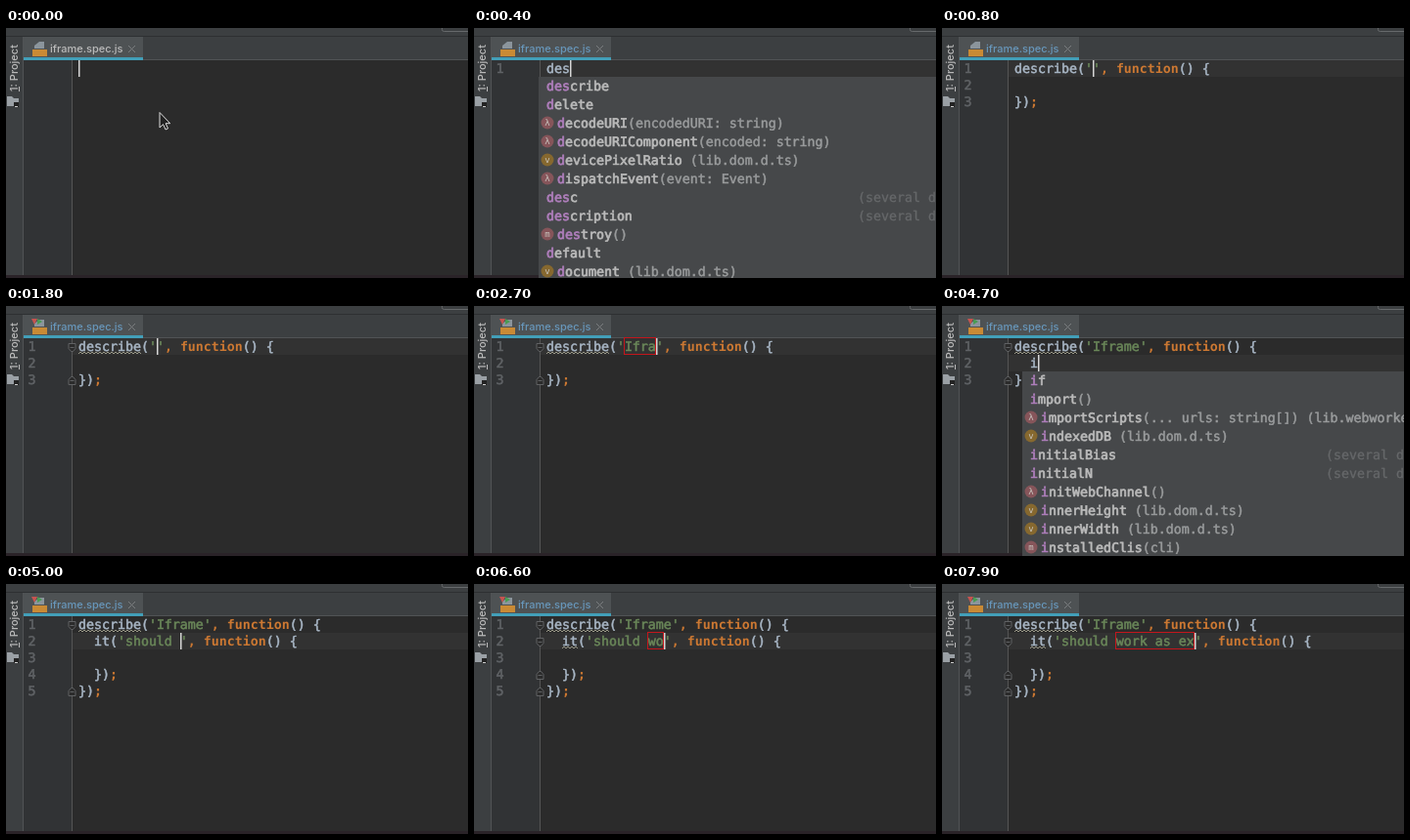
Animation of 472 by 256 pixels, one loop 8 s. Source, as an HTML page:

```html
<!DOCTYPE html>
<html lang="en">
<head>
<meta charset="utf-8">
<title>Editor typing</title>
<style>
html, body { margin: 0; width: 100%; height: 100%; overflow: hidden; background: #2b2b2b; }
svg { display: block; width: 472px; height: 256px; }
text { white-space: pre; font: 500 11px Inter, "Liberation Sans", sans-serif; fill: #bbb; }
.code text { font: 13.288px "DejaVu Sans Mono", monospace; fill: #a9b7c6; stroke: #a9b7c6; stroke-width: .55; text-rendering: geometricPrecision; }
.code .num { fill: #606366; stroke: #606366; }
.code .str { fill: #6a8759; stroke: #6a8759; }
.code .key { fill: #cc7832; stroke: none; font-weight: bold; }
.code .name { fill: #bbb; stroke: #bbb; stroke-width: .7; }
.code .hit { fill: #b07fbd; stroke: #b07fbd; }
.code .dim { fill: #66686a; stroke: #66686a; stroke-width: .3; }
.code .tail { fill: #9a9c9d; stroke: #9a9c9d; stroke-width: .5; }
.code .mark { font: 9px "DejaVu Sans Mono", monospace; fill: #c8c3bd; stroke: none; text-anchor: middle; }
</style>
</head>
<body>
<svg viewBox="0 0 472 256">
  <rect width="472" height="256" fill="#2b2b2b"/>
  <rect id="row" x="68" width="404" height="17" fill="#323232"/>
  <rect x="18" y="33" width="50" height="223" fill="#313335"/>
  <path d="M67.5 33V256" stroke="#555"/>
  <rect width="472" height="32" fill="#3c3f41"/>
  <rect width="17" height="256" fill="#3c3f41"/>
  <path d="M0 8.5H472" stroke="#2e3032"/>
  <path d="M17.5 9V253M140 32.5H472" stroke="#515355"/>
  <path d="M445.500 0V1.500Q445.500 3.500 447.500 3.500H472" fill="none" stroke="#66696b"/>
  <rect x="18" y="9" width="122" height="21" fill="#4e5254"/>
  <rect x="18" y="30" width="122" height="3" fill="#429fb9"/>
  <path d="M34 14h5v7H29v-3z" fill="#8b959c"/>
  <path id="tests" d="M26 13h6l-3 6z" fill="#c75450"/>
  <path id="passes" d="M32 13l5 3-5 3z" fill="#499c54"/>
  <rect x="27" y="22" width="15" height="7" fill="#c98a35"/>
  <text id="file" x="45" y="25">iframe.spec.js</text>
  <path d="M125 18l7 7m0-7l-7 7" stroke="#7b7e80"/>
  <g transform="translate(11.500 65) rotate(-90)">
    <text>1: Project</text>
    <path d="M0 2H5" stroke="#bbb"/>
  </g>
  <path d="M1 70h5l2 2h5v4h-5v4H1z" fill="#9aa0a5"/>
  <path d="M8 76h5v5H8z" fill="#232323"/>
  <path d="M9 80.500h3" stroke="#ccc"/>
  <rect y="253" width="472" height="3" fill="#2a2328"/>
  <g id="code" class="code"></g>
  <path id="mouse" d="M157 86.500V102l3.600-3.300 2.400 5.300 2.500-1.100-2.400-5.200h4.600z" fill="#222" stroke="#ddd"/>
</svg>
<script>
const LOOP = 8000, CHAR = 8, LEFT = 74, LINE = 17;
const $ = id => document.getElementById(id);
const col = n => LEFT + n * CHAR;
const lineTop = line => 33 + line * LINE;

// Keystroke times for the two titles
const titleKeys = [2200, 2400, 2500, 2700, 2800, 2900];
const workKeys = [6500, 6600, 6800, 6900, 7100, 7300, 7500, 7500, 7700, 7900];
const typed = (word, keys, t) => word.slice(0, keys.filter(k => k <= t).length);

// Each suggestion: icon, name, greyed tail, right-hand note
const describeList = [
  ["", "describe"], ["", "delete"], ["λ", "decodeURI", "(encodedURI: string)"],
  ["λ", "decodeURIComponent", "(encoded: string)"], ["v", "devicePixelRatio", " (lib.dom.d.ts)"],
  ["λ", "dispatchEvent", "(event: Event)"], ["", "desc", "", "(several d"],
  ["", "description", "", "(several d"], ["m", "destroy", "()"], ["", "default"], ["v", "document", " (lib.dom.d.ts)"]
];
const iList = [
  ["", "if"], ["", "import", "()"],
  ["λ", "importScripts", "(... urls: string[]) (lib.webworker.d.ts)"],
  ["v", "indexedDB", " (lib.dom.d.ts)"], ["", "initialBias", "", "(several d"],
  ["", "initialN", "", "(several d"], ["λ", "initWebChannel", "()"],
  ["v", "innerHeight", " (lib.dom.d.ts)"], ["v", "innerWidth", " (lib.dom.d.ts)"],
  ["m", "installedClis", "(cli)"]
];
const itList = [
  ["", "it"], ["", "items", "", "(several d"], ["", "iterator", "", "(several d"],
  ...iList.slice(4, 6), ["λ", "isNaN", "(number: number)"], ["", "item", "", "(several d"],
  ...iList.slice(7)
];
const iconFill = { "λ": "#86555a", v: "#86682f", m: "#86555a" };

function text(x, y, body, cls = "") {
  return `<text x="${x}" y="${y}" class="${cls}">${body}</text>`;
}

function highlight(source) {
  return source.replace(/('[^']*')|function|[,;]/g,
    (token, quoted) => `<tspan class="${quoted ? "str" : "key"}">${token}</tspan>`);
}

function popup(x, y, prefix, items) {
  const rows = items.map(([icon, name, tail = "", note], i) => {
    const mid = y + 9 + i * 19;
    const badge = icon && `<circle cx="${x + 9}" cy="${mid}" r="6.500" fill="${iconFill[icon]}"/>` +
      text(x + 9, mid + 3, icon, "mark");
    const hit = name.startsWith(prefix) ? prefix.length : 1;
    const label = `<tspan class="hit">${name.slice(0, hit)}</tspan>${name.slice(hit)}<tspan class="tail">${tail}</tspan>`;
    return badge + text(x + (icon ? 19 : 8), mid + 5, label, "name") + (note ? text(392, mid + 5, note, "dim") : "");
  });
  return `<rect x="${x}" y="${y}" width="${472 - x}" height="${256 - y}" fill="#46484a"/>` + rows.join("");
}

function fold(line, up) {
  const flip = up ? "scale(1 -1)" : "";
  return `<path transform="translate(67.500 ${lineTop(line) + 9.5}) ${flip}" d="M-3.500-4H3.500V1L1 4H-1L-3.500 1zM-2 0H2" fill="#2b2b2b" stroke="#606264"/>`;
}

function squiggle(from, chars, line) {
  return `<path d="M${col(from)} ${lineTop(line) + 16}${"l2-2 2 2".repeat(chars * 2)}" fill="none" stroke="#a5a491" stroke-width=".9"/>`;
}

function stateAt(t) {
  if (t < 800) {
    const word = t < 200 ? "" : t < 300 ? "d" : t < 400 ? "de" : "des";
    return { lines: [word], line: 0, column: word.length,
      popup: t >= 400 && [66, 50, word, describeList] };
  }
  const title = typed("Iframe", titleKeys, t);
  const head = `describe('${title}', function() {`;
  if (t < 3800) {
    return { lines: [head, "", "});"], line: 0, column: 10 + title.length, box: title && 10 };
  }
  if (t < 5000) {
    const word = t < 4500 ? "" : t < 4800 ? "i" : "it";
    return { lines: [head, "  " + word, "});"], line: 1, column: 2 + word.length,
      popup: t >= 4700 && [82, 67, word, word === "i" ? iList : itList] };
  }
  const work = typed("work as ex", workKeys, t);
  return { lines: [head, `  it('should ${work}', function() {`, "", "  });", "});"],
    line: 1, column: 13 + work.length, box: work && 13 };
}

function show(id, visible) {
  $(id).style.display = visible ? "" : "none";
}

function draw(t) {
  const s = stateAt(t), last = s.lines.length - 1, y = lineTop(s.line), x = col(s.column);
  const started = t >= 200, checked = t >= 1100, nested = t >= 5200;
  let out = "";
  s.lines.forEach((source, i) => {
    const base = lineTop(i) + 13;
    if (started) out += text(22.5, base, i + 1, "num");
    out += text(LEFT, base, highlight(source));
  });
  if (checked) out += fold(0) + fold(last, true) + squiggle(0, 8, 0);
  if (nested) out += fold(1) + fold(3, true) + squiggle(2, 2, 1);
  if (s.box) {
    out += `<rect x="${col(s.box) - .5}" y="${y - .5}" width="${x - col(s.box)}" height="17" fill="none" stroke="#c4161c"/>`;
  }
  if (t < 5800 || t >= 6300) out += `<rect x="${x}" y="${y}" width="1.500" height="17" fill="#d5d5d5"/>`;
  if (s.popup) out += popup(...s.popup);

  $("code").innerHTML = out;
  $("row").setAttribute("y", y);
  $("file").style.fill = started ? "#6897bb" : "";
  show("row", started);
  show("mouse", !started);
  show("tests", checked);
  show("passes", checked);
}

let shown = -1;
function tick(now) {
  // The screen only changes on 100 ms steps
  const step = Math.floor(now % LOOP / 100);
  if (step !== shown) draw((shown = step) * 100);
  requestAnimationFrame(tick);
}
draw(0);
requestAnimationFrame(tick);
</script>
</body>
</html>
```
